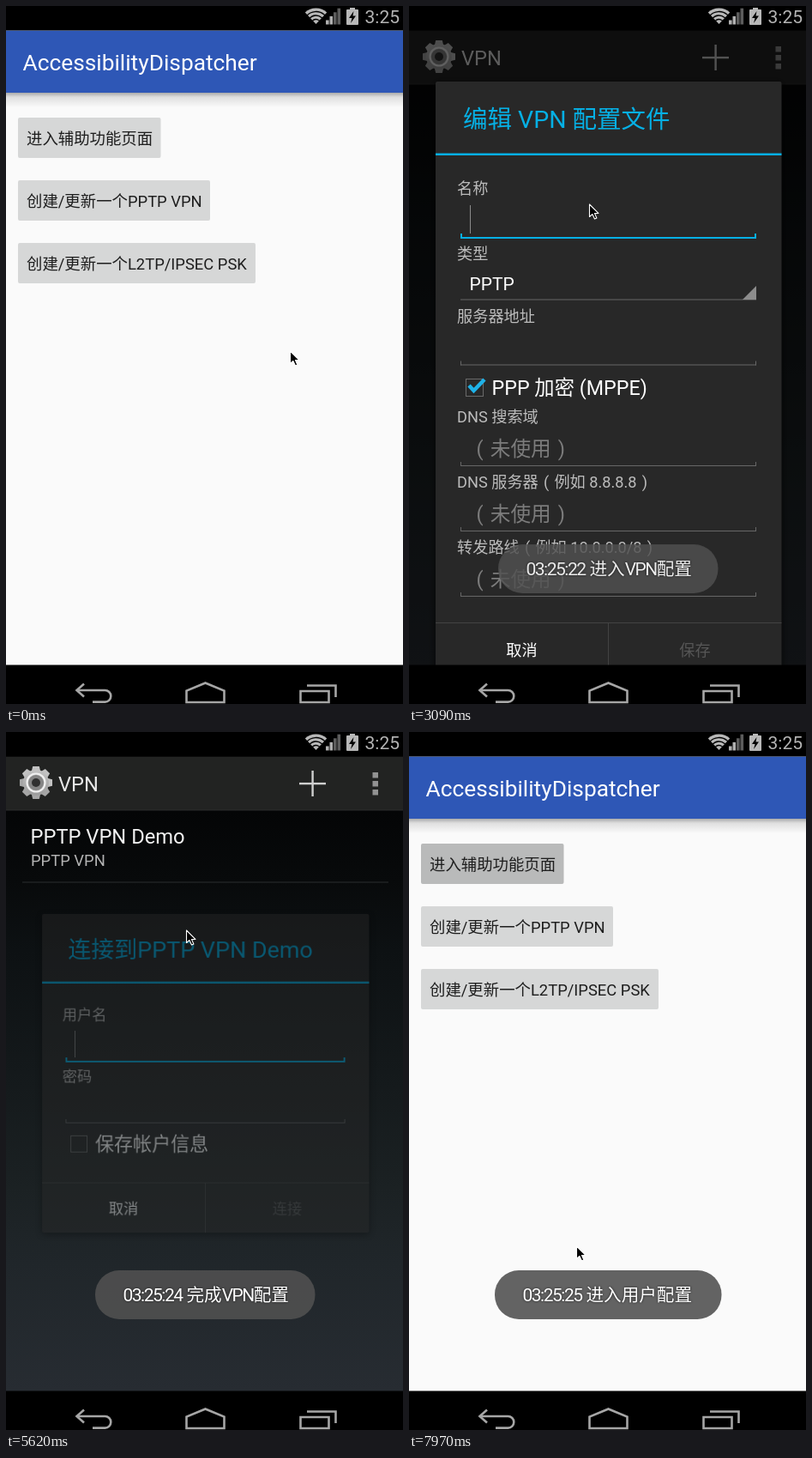
These frames come from a looping animation (463x813 px, 8000 ms). An HTML page with a canvas:

```html
<!DOCTYPE html>
<html lang="zh-CN">
<head>
<meta charset="utf-8">
<style>
  html, body { margin: 0; width: 100%; height: 100%; overflow: hidden; background: #000; }
  canvas { display: block; width: 100vw; height: 100vh; }
</style>
</head>
<body>
<canvas id="stage" width="463" height="813"></canvas>
<script>
const W = 463, H = 813, LOOP = 8000, MID = 232.5;
const FONT = 'Roboto, "Noto Sans CJK SC", "Noto Sans CJK", sans-serif';
const BLUE = '#06b0e5', GRAY = '#a6a6a6', LABEL = '#bcbcbc';
const stage = document.getElementById('stage').getContext('2d');
const bufferCanvas = Object.assign(document.createElement('canvas'), { width: W, height: H });
const buffer = bufferCanvas.getContext('2d');
let g = stage;

function rect(x, y, w, h, color, radius = 0) {
  g.fillStyle = color;
  g.beginPath();
  g.roundRect(x, y, w, h, radius);
  g.fill();
}

function poly(points, { fill, stroke, width = 1, closed = true }) {
  g.beginPath();
  points.forEach(([x, y]) => g.lineTo(x, y));
  if (closed) g.closePath();
  if (fill) { g.fillStyle = fill; g.fill(); }
  if (stroke) { g.strokeStyle = stroke; g.lineWidth = width; g.stroke(); }
}

function circle(x, y, r, color, line) {
  g.beginPath();
  g.arc(x, y, r, 0, Math.PI * 2);
  if (line) { g.strokeStyle = color; g.lineWidth = line; g.stroke(); }
  else { g.fillStyle = color; g.fill(); }
}

function text(str, x, y, size, color, align = 'left') {
  g.font = `${size}px ${FONT}`;
  g.textAlign = align;
  g.fillStyle = color;
  g.fillText(str, x, y);
  return g.measureText(str).width;
}

// Parentheses centred in a full-width cell: a third of an em on each side.
const wideParens = str => `\u2004(\u2004${str}\u2004)\u2004`;

function gradient(y0, y1, stops) {
  const fill = g.createLinearGradient(0, y0, 0, y1);
  stops.forEach(([at, color]) => fill.addColorStop(at, color));
  return fill;
}

// Draws a group as one sheet, scaled about the middle and faded.
function layer(alpha, scale, cy, draw) {
  if (alpha === 1 && scale === 1) return draw();
  buffer.clearRect(0, 0, W, H);
  g = buffer;
  draw();
  g = stage;
  g.save();
  g.globalAlpha = alpha;
  g.translate(MID, cy);
  g.scale(scale, scale);
  g.drawImage(bufferCanvas, -MID, -cy);
  g.restore();
}

function statusBar() {
  rect(0, 0, W, 28.5, '#000');
  const fan = (r, a) => { g.beginPath(); g.arc(361.5, 21, r, -Math.PI / 2 - a, -Math.PI / 2 + a); };
  fan(18.5, 0.76);
  g.lineTo(361.5, 21);
  g.fillStyle = '#b8b8b8';
  g.fill();
  g.strokeStyle = '#000';
  g.lineWidth = 1.3;
  for (const r of [5.5, 10, 14.5]) { fan(r, 0.85); g.stroke(); }
  for (let i = 0; i < 4; i++) {
    const h = 5 + i * 4.6;
    rect(373 + i * 4.5, 21.5 - h, 3.6, h, i < 2 ? '#b0b0b0' : '#5c5c5c');
  }
  rect(401, 2, 6, 4, '#b8b8b8');
  rect(397, 4, 14, 18, '#b8b8b8', 1);
  poly([[405.5, 6], [400, 14], [403.5, 14], [402, 20], [408, 11.5], [404.5, 11.5]], { fill: '#000' });
  text('3:25', 418.5, 20, 21, '#b4b4b4');
}

function navBar() {
  rect(0, 767.5, W, 46, '#000');
  const line = (points, closed) => poly(points, { stroke: GRAY, width: 2.6, closed });
  line([[91, 789.5], [82.5, 797], [91, 804.5]], false);
  g.beginPath();
  g.moveTo(83, 797);
  g.lineTo(115, 797);
  g.arc(115.5, 803.8, 6.8, -Math.PI / 2, Math.PI / 2);
  g.lineTo(101, 810.6);
  g.stroke();
  line([[210.5, 811], [210.5, 797.5], [232.5, 788.5], [254.5, 797.5], [254.5, 811]], true);
  line([[343.5, 798], [376.5, 798], [376.5, 811], [343.5, 811]], true);
  line([[351, 791.5], [384.5, 791.5], [384.5, 805]], false);
}

function homePage(pressed) {
  rect(0, 28, W, 740, '#fafafa');
  rect(0, 101, W, 17, gradient(101, 118, [[0, 'rgba(0,0,0,.32)'], [0.3, 'rgba(0,0,0,.11)'], [1, 'rgba(0,0,0,0)']]));
  rect(0, 28.5, W, 72.5, '#2e57b6');
  text('AccessibilityDispatcher', 19.5, 75, 26.3, '#fff');
  const button = (label, y, w, color) => {
    rect(14, y, w, 47, color, 2);
    text(label, 24, y + 30.5, 18.4, '#1e1e1e');
  };
  button('进入辅助功能页面', 130, 166.5, pressed ? '#b9baba' : '#d6d7d7');
  button('创建/更新一个PPTP VPN', 203, 224, '#d6d7d7');
  button('创建/更新一个L2TP/IPSEC PSK', 276, 277, '#d6d7d7');
}

function gear(x, y) {
  g.save();
  g.translate(x, y);
  for (let i = 0; i < 8; i++) {
    poly([[-5.5, -12], [-3.8, -19], [3.8, -19], [5.5, -12]], { fill: i < 3 || i > 6 ? '#c2c2c2' : '#a6a6a6' });
    g.rotate(Math.PI / 4);
  }
  circle(0, 0, 15, gradient(-15, 15, [[0, '#c4c4c4'], [1, '#9c9c9c']]));
  circle(0, 0, 9, '#858585');
  circle(0, 0, 10.5, '#f0f0f0', 2.2);
  circle(0, 0, 5, '#303030');
  g.restore();
}

function vpnBackdrop(bottom) {
  rect(0, 28.5, W, bottom - 28.5, gradient(92, 768, [
    [0, '#040506'], [0.12, '#080a0b'], [0.24, '#0d1113'], [0.45, '#14191b'],
    [0.65, '#1b2123'], [0.78, '#20262a'], [1, '#272c32']]));
  rect(0, 28.5, W, 62.5, '#222322');
}

function vpnPage(hasItem, focused, bottom = 768) {
  vpnBackdrop(bottom);
  rect(0, 90.5, W, 1, '#2d2f2e');
  gear(35, 59);
  text('VPN', 61, 69, 23.7, '#e8e8e8');
  rect(342, 58.9, 31, 2.4, '#cfcfcf');
  rect(356.4, 45, 2.4, 30, '#cfcfcf');
  for (let i = 0; i < 3; i++) rect(427.5, 47 + i * 10, 6.5, 6.5, '#929292');
  if (!hasItem) return;
  rect(19, 174.5, 427, 1, '#2b2e30');
  if (focused) {
    rect(19, 91, 427, 84, 'rgba(51,181,229,.3)');
    g.strokeStyle = '#27819f';
    g.lineWidth = 3;
    g.strokeRect(20.5, 92.5, 424, 81);
  }
  text('PPTP VPN Demo', 28.5, 130, 23.7, '#f2f2f2');
  text('PPTP VPN', 29, 156, 18.4, '#b4b4b4');
}

// Dialog parts below use heights measured from the dialog's top edge.
function dialogFrame(title, height, ok, okEnabled) {
  g.save();
  g.shadowColor = 'rgba(0,0,0,.7)';
  g.shadowBlur = 8;
  g.shadowOffsetY = 2;
  rect(31, 0, 403.5, height, '#282828', 2);
  g.restore();
  text(title, 63, 53.5, 28.5, BLUE);
  rect(31, 83.5, 403.5, 2.6, BLUE);
  rect(31, height - 62, 403.5, 1, '#434343');
  rect(232, height - 62, 1, 62, '#434343');
  text('取消', 131.5, height - 23, 18.2, '#fff', 'center');
  text(ok, 333.5, height - 23, 18.2, okEnabled ? '#fff' : '#565656', 'center');
}

function field(label, y, value, focused, hint = '') {
  text(label, 56, y, 18.2, LABEL);
  const shown = value || hint;
  const width = text(shown, 70.5, y + 39, 23.7, value ? '#fff' : '#7c7c7c');
  const color = focused ? BLUE : '#676767', line = focused ? 2 : 1;
  rect(60, y + 50, 345, line, color);
  rect(60, y + 46, line, 5, color);
  rect(405 - line, y + 46, line, 5, color);
  if (focused) rect(71 + (value ? width : 0), y + 13, 1, 33, '#8a8a8a');
}

function checkBox(label, y, checked) {
  g.strokeStyle = '#6a6a6a';
  g.lineWidth = 1;
  g.strokeRect(66.5, y + 0.5, 20, 20);
  if (checked) poly([[70, y + 8], [75.5, y + 14], [88, y + 1]], { stroke: '#1fb2e8', width: 4.5, closed: false });
  text(label, 96.5, y + 18.5, 23.3, '#fff');
}

function editDialog(top, step) {
  g.save();
  g.translate(0, top);
  const early = step >= 26, late = step >= 27;
  dialogFrame('编辑 VPN 配置文件', 692, '保存', step >= 31);
  field('名称', 131, early ? 'PPTP VPN Demo' : '', !early);
  text('类型', 56, 207, 18.2, LABEL);
  text('PPTP', 70.5, 242.5, 21, '#fff');
  rect(60, 253.5, 345, 1, '#676767');
  poly([[405, 238], [405, 254], [389, 254]], { fill: '#8d8d8d' });
  field('服务器地址', 279.5, early ? '1.2.3.4' : '', early && !late);
  checkBox('PPP 加密 (MPPE)', 346, true);
  const hint = wideParens('未使用'), dns = late ? '8.8.8.8' : '';
  field('DNS 搜索域', 397, dns, false, hint);
  field('DNS 服务器' + wideParens('例如 8.8.8.8'), 473, dns, false, hint);
  field('转发路线' + wideParens('例如 10.0.0.0/8'), 549, late ? '10.0.0.0/8' : '', late, hint);
  g.restore();
}

function connectDialog() {
  g.save();
  g.translate(0, 201);
  dialogFrame('连接到PPTP VPN Demo', 393, '连接', false);
  field('用户名', 131, '', true);
  field('密码', 207, '', false);
  checkBox('保存帐户信息', 273, false);
  g.restore();
}

function toast(x, w, clock, runs, alpha) {
  layer(alpha, alpha < 1 ? 0.9999 : 1, 655, () => {
    rect(x, 627, w, 57, 'rgba(81,81,81,.886)', 28);
    g.save();
    g.shadowColor = 'rgba(0,0,0,.7)';
    g.shadowBlur = 3;
    let at = x + 32.5;
    [clock, ...runs].forEach((run, i) => {
      const latin = run.charCodeAt(0) < 128;
      g.letterSpacing = latin ? '-1.5px' : '0px';
      at += text(run, at, latin ? 663 : 662.5, latin ? 21 : 20.6, '#fff') + (i ? 0 : 5);
    });
    g.letterSpacing = '0px';
    g.restore();
  });
}

function toasts(step) {
  const show = (from, to, fades, draw) => {
    if (step >= from && step <= to) draw(fades[step] ?? 1);
  };
  show(20, 35, { 20: 0.4, 21: 0.93, 35: 0.5 }, a => toast(104, 256.5, '03:25:22', ['进入', 'VPN', '配置'], a));
  show(37, 50, { 37: 0.6, 50: 0.4 }, a => toast(104, 256.5, '03:25:24', ['完成', 'VPN', '配置'], a));
  show(51, 99, { 51: 0.5 }, a => toast(100, 264.5, '03:25:25', ['进入用户配置'], a));
}

const clamp = v => Math.min(1, Math.max(0, v));
const ease = v => v * v * (3 - 2 * v);
const bezier = (a, b, c, p) => a.map((v, i) => v * (1 - p) ** 2 + 2 * b[i] * p * (1 - p) + c[i] * p * p);

function pointer(step) {
  const rest = [210, 231];
  const [x, y] = step < 48
    ? bezier([331, 402], [448, 345], rest, ease(clamp((step - 1) / 7)))
    : bezier(rest, [573, 390], [195, 599], ease(clamp((step - 47) / 7)));
  const shape = [[0, 0], [0, 14.5], [3.4, 11.5], [6, 17], [8.4, 16], [6, 10.6], [10.4, 10.4]];
  g.lineJoin = 'round';
  poly(shape.map(([px, py]) => [x + 0.5 + px, y + px * 0 + py]), { fill: '#000', stroke: '#fff', width: 1.1 });
  g.lineJoin = 'miter';
}

function dialogs(step) {
  const fade = (alpha, scale, draw) => layer(alpha, scale, 397.5, draw);
  if (step >= 19 && step < 38) rect(0, 28.5, W, 740, `rgba(0,0,0,${step === 19 ? 0.35 : 0.6})`);
  if (step === 19) fade(0.5, 0.95, () => editDialog(88, step));
  else if (step >= 20 && step <= 33) editDialog(step < 22 ? 88 : 51, step);
  else if (step === 34) fade(0.55, 0.95, () => editDialog(51, step));
  else if (step === 35) fade(0.5, 0.95, connectDialog);
  else if (step === 36 || step === 37) connectDialog();
  else if (step === 38) fade(0.45, 0.945, connectDialog);
  else if (step === 39) fade(0.15, 0.91, connectDialog);
}

function draw(time) {
  // The screen is refreshed about seven times a second.
  const step = Math.floor((time + 12) / 147.5);
  g = stage;
  rect(0, 0, W, H, '#000');
  if (step < 16 || step >= 44) homePage(step >= 44);
  if (step === 16) {
    vpnBackdrop(768);
    layer(1, 0.995, 406.5, () => vpnPage(false, false));
  } else if (step > 16 && step < 44) {
    vpnPage(step >= 32, step >= 32 && step < 38);
  } else if (step === 44) {
    layer(0.275, 0.866, 406.5, () => vpnPage(true, false, 759));
  }
  dialogs(step);
  statusBar();
  navBar();
  toasts(step);
  pointer(step);
}

function tick() {
  draw(performance.now() % LOOP);
  requestAnimationFrame(tick);
}
tick();
</script>
</body>
</html>
```
